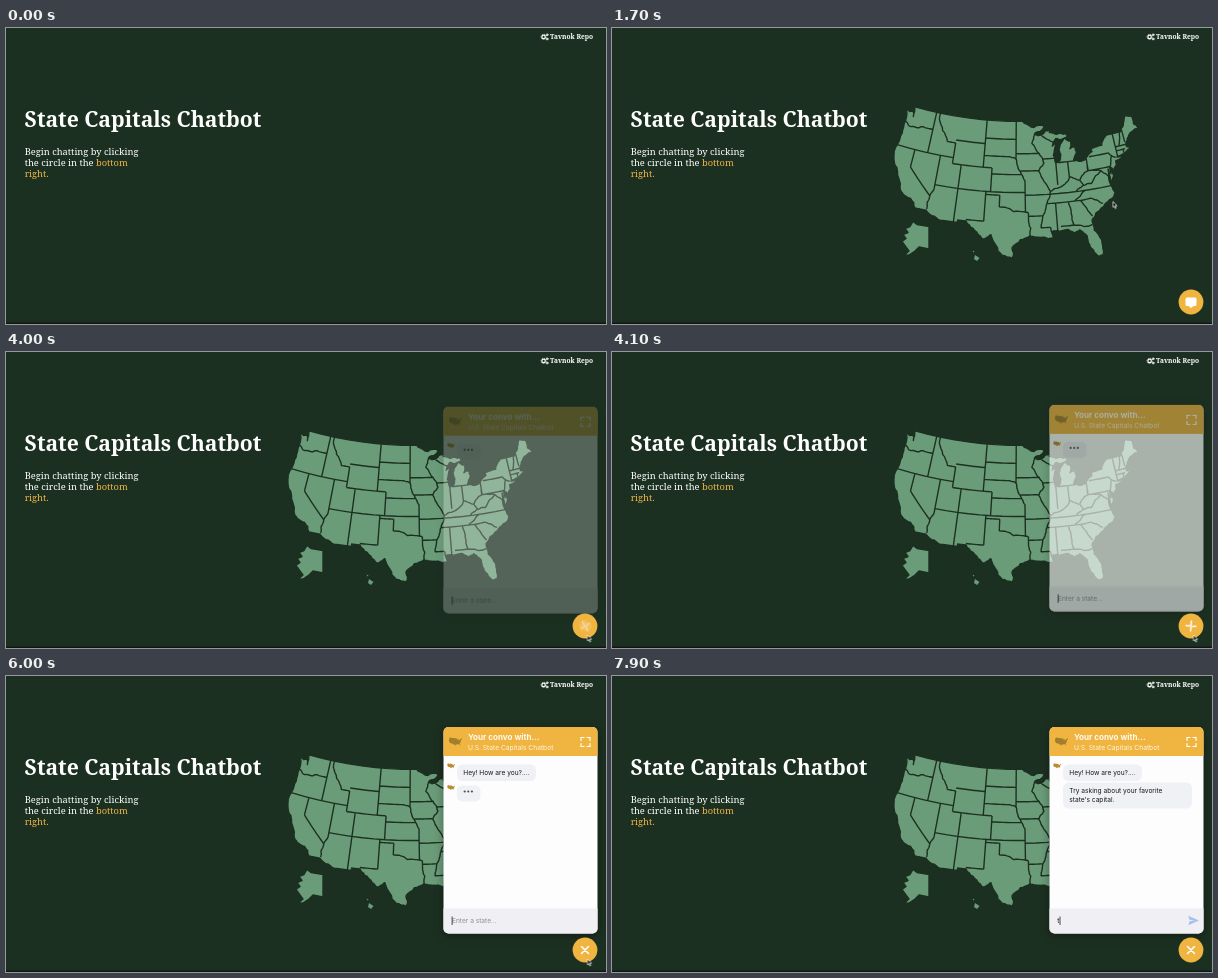
These frames come from a looping animation (600x296 px, 8000 ms). An HTML page:

```html
<!DOCTYPE html>
<html lang="en">
<head>
<meta charset="utf-8">
<title>State Capitals Chatbot</title>
<style>
  html, body { margin: 0; width: 100%; height: 100%; overflow: hidden; background: #1c3021; }
  svg { display: block; width: 100vw; height: 100vh; }
  text { white-space: pre; }
  .serif { font-family: "Noto Serif", serif; fill: #fff; }
  .sans { font: 6.6px Inter, sans-serif; fill: #16171a; }
  .bold { font-weight: 700; }
  .accent { fill: #efb548; }
  .yellow { fill: #f0b440; }
  .bubble { fill: #f0f1f5; }
  .line { fill: none; stroke: #fff; stroke-linecap: round; }
  .spin { transform-box: fill-box; transform-origin: center; }
  #map { fill: #6b9c79; stroke: #1c3021; stroke-width: 1.4; stroke-linejoin: round; }
  #panel { filter: drop-shadow(0 2px 5px rgba(0, 0, 0, .35)); }
</style>
</head>
<body>
<svg viewBox="0 0 600 296">
  <defs>
    <path id="land"/>
    <g id="dots" fill="#4c4e52">
      <circle cx="458.7" r="1.1"/><circle cx="462.3" r="1.1"/><circle cx="465.9" r="1.1"/>
    </g>
  </defs>
  <rect width="600" height="296" fill="#1c3021"/>
  <rect y="294.6" width="600" height="1.4" fill="#101511"/>

  <g class="line">
    <circle cx="537.6" cy="8.9" r="1.7" stroke-width="1.2"/>
    <circle cx="537.6" cy="8.9" r="2.6" stroke-width=".8" stroke-dasharray=".9 1.14" stroke-linecap="butt"/>
    <circle cx="541.1" cy="6.8" r=".9" stroke-width=".9"/>
    <circle cx="541.1" cy="11" r=".9" stroke-width=".9"/>
  </g>
  <text class="serif bold" x="544" y="11.1" font-size="6.6">Tavnok Repo</text>
  <text class="serif bold" x="18.5" y="98.5" font-size="21.15">State Capitals Chatbot</text>
  <g class="serif" font-size="9.3">
    <text x="18.7" y="127.2">Begin chatting by clicking</text>
    <text x="18.7" y="138.2">the circle in the <tspan class="accent">bottom</tspan></text>
    <text class="accent" x="18.7" y="149.2">right.</text>
  </g>

  <g id="map">
    <use href="#land"/>
    <path id="borders" fill="none"/>
    <path d="M301 193.500l4 3 12 2v22.500l-5-1-5-1-4 4-6 4-5 .5 5-4.500-3-4-4-5.500 4-3-3-4 5-2-3-4 5-2z"/>
    <path stroke="none" d="M363 227l4.500 3-2.500 3-3-2zM360.500 222.500l2 1-1 1z"/>
  </g>

  <g id="panel">
    <rect x="437.5" y="51" width="154" height="206.500" rx="5" fill="#fdfdfd"/>
    <path class="yellow" d="M437.500 80V56a5 5 0 0 1 5-5h144a5 5 0 0 1 5 5v24z"/>
    <path fill="#f0f0f4" d="M437.500 232.500h154v20a5 5 0 0 1-5 5h-144a5 5 0 0 1-5-5z"/>
    <use href="#land" fill="#a17e2c" transform="translate(449.500 65.500) scale(.054) translate(-404 -154)"/>
    <text class="sans bold" x="462" y="64.200" style="font-size:8.1px;fill:#fffaf0">Your convo with...</text>
    <text class="sans" x="462" y="73.600" style="font-size:6.7px;fill:#fff6e0">U.S. State Capitals Chatbot</text>
    <path class="line" stroke-width="1.2" d="M575 64.500v-3h3M581 61.500h3v3M584 67.500v3h-3M578 70.500h-3v-3"/>

    <use href="#land" fill="#b98a30" transform="translate(445.200 89.800) scale(.032) translate(-404 -154)"/>
    <g id="typing1">
      <rect class="bubble" x="451" y="88" width="23.500" height="16" rx="5"/>
      <use href="#dots" y="94"/>
    </g>
    <g id="message1">
      <rect class="bubble" x="451" y="88.500" width="79" height="16.500" rx="5.500"/>
      <text class="sans" x="457.300" y="99.400">Hey! How are you?....</text>
    </g>
    <g id="typing2">
      <use href="#land" fill="#b98a30" transform="translate(445.200 111.500) scale(.032) translate(-404 -154)"/>
      <rect class="bubble" x="451" y="109.500" width="23.500" height="16" rx="5"/>
      <use href="#dots" y="115.500"/>
    </g>
    <g id="message2">
      <rect class="bubble" x="451" y="106.500" width="129" height="26" rx="5.500"/>
      <text class="sans" x="457.300" y="117.400">Try asking about your favorite</text>
      <text class="sans" x="457.300" y="126">state's capital.</text>
    </g>

    <g id="empty">
      <text class="sans" x="446" y="247" style="fill:#8c8e94">Enter a state...</text>
      <rect x="445.700" y="240.500" width=".8" height="8.500" fill="#222"/>
    </g>
    <g id="typed">
      <text class="sans" x="445.300" y="247">t</text>
      <rect x="447.600" y="240.500" width=".8" height="8.500" fill="#222"/>
      <path fill="#a3c1f2" d="M576.300 239.800l10.700 4.700-10.700 4.700 1.200-3.900 5-.8-5-.8z"/>
    </g>
  </g>

  <g id="button">
    <circle class="yellow" cx="579" cy="274" r="12.400"/>
    <path id="chat" class="spin" fill="#fff" d="M575 269.500h8a1.500 1.500 0 0 1 1.500 1.500v5.500a1.500 1.500 0 0 1-1.500 1.500h-1.500l-2.500 2-2.500-2h-1.500a1.500 1.500 0 0 1-1.500-1.500v-5.500a1.500 1.500 0 0 1 1.500-1.500z"/>
    <path id="close" class="line spin" stroke-width="1.500" d="M575.500 270.500l7 7m0-7l-7 7"/>
  </g>
  <path id="cursor" d="M0 0V5.800L1.300 4.700 2.400 7 3.200 6.600 2.200 4.300H4Z" fill="#0a0d0a" stroke="#fff" stroke-width=".7"/>
</svg>

<script>
const LOOP = 8000;
const $ = id => document.getElementById(id);

// Albers equal-area conic projection, scaled to the stage.
const rad = Math.PI / 180;
const sinA = Math.sin(29.5 * rad), sinB = Math.sin(45.5 * rad);
const cone = (sinA + sinB) / 2, base = 1 + sinA * sinB;
function project([west, lat]) {
  const radius = 339 * Math.sqrt(base - 2 * cone * Math.sin(lat * rad)) / cone;
  const angle = cone * (96 - west) * rad;
  return [406.6 + radius * Math.sin(angle), radius * Math.cos(angle) - 280.2].map(v => v.toFixed(2));
}

let seed = 7;
const random = () => (seed = seed * 16807 % 2147483647) / 2147483647;

// Splits a leg by midpoints, pushed sideways for natural lines and left in place for surveyed ones.
function wander(a, b, rough, depth = 3) {
  if (!depth) return [a];
  const push = rough * (random() - .5);
  const mid = [(a[0] + b[0]) / 2 + (b[1] - a[1]) * push, (a[1] + b[1]) / 2 - (b[0] - a[0]) * push];
  return [...wander(a, mid, rough, depth - 1), ...wander(mid, b, rough, depth - 1)];
}
function trace(places, rough) {
  const legs = places.slice(1).flatMap((place, i) => {
    const surveyed = place[1] === places[i][1];
    return wander(places[i], place, surveyed ? 0 : rough);
  });
  return 'M' + [...legs, places[places.length - 1]].map(project).join('L');
}
const parse = text => text.trim().split(/\s+/).map(pair => pair.split(',').map(Number));

// Places are degrees west, degrees north.
const pacific = `117.1,32.5 118.4,33.9 120.6,34.6 122.4,37.6 124.3,40.4 124.2,42 124,46.2 124.7,48.3
  122.6,48.1 122.4,47.3 122.7,49 95.15,49`;
const lakes = `95.1,49.3 94.6,48.7 89.6,48 92.1,46.75 90.4,46.6 87.9,47.4 88.4,46.9 86.5,46.5 84.5,46.4 84,46
  87,45.8 88,44.55 87.2,45.1 87.9,43 87.5,41.7 86.8,41.8 86.2,42.9 86.4,44.1 84.8,45.75 83.4,45.1 83.9,43.8
  82.7,44 82.5,43 83.4,41.7 81.5,41.5 78.9,42.8 79,43.3 76.4,43.5 74.8,45 71.4,45`;
const atlantic = `70.3,45.9 69.2,47.4 67.8,47.1 67.8,45.7 67,44.85 70.2,43.6 70.9,42.3 70,41.8 71.4,41.45 73.6,41
  72,41.1 74,40.5 74.1,39.7 74.9,39 75.5,39.5 75.2,38.2 75.9,37.2 76.1,39.4 76.3,37 75.6,35.3 77.9,33.9
  79.2,33.1 81.3,31.5 81.2,29.7 80.1,27 80.3,25.4 81.1,25.15`;
const gulf = `82.7,27.8 82.7,28.9 84,30.1 85.2,29.7 86.3,30.4 89.5,30.2 89.2,29.1 91.3,29.4 93.8,29.7 97.2,27.8
  97.2,25.95 99.1,26.4 101.4,29.8 103,29 104.9,30.6 106.5,31.75 108.2,31.75 108.2,31.33 111.1,31.33 114.8,32.5`;
$('land').setAttribute('d', trace(parse([pacific, lakes, atlantic, gulf].join(' ')), .25) + 'Z');

const row = (lat, ...ends) => trace(ends.map(west => [west, lat]), 0);
const column = (west, ...ends) => trace(ends.map(lat => [west, lat]), 0);
const river = text => trace(parse(text), .2);

const surveyed = [
  row(46, 119, 117), row(45.94, 104, 96.6), row(45, 111, 104), row(43.5, 96.5, 91.2), row(43, 104, 98),
  row(42.72, 73.3, 70.8), row(42.5, 90.6, 87.8), row(42.03, 73.5, 71.3), row(42, 124.2, 111), row(42, 79.8, 75.3),
  row(41.7, 87, 83.4), row(41, 111, 102), row(40.6, 95.7, 91.5), row(40, 102, 95.3), row(39.72, 80.5, 75.5),
  row(37, 114, 94.6), row(36.55, 94.6, 76), row(36.5, 103, 100), row(35, 90.2, 83.1), row(33, 94, 91.1),
  row(32, 106.6, 103), row(31, 91.6, 89.7), row(31, 87.6, 85),
  column(120, 42, 39), column(117, 49, 42), column(114, 42, 36.2), column(111, 44.5, 41), column(109, 41, 31.3),
  column(104, 49, 41), column(103, 37, 32), column(102, 41, 37), column(100, 36.5, 34.5), column(96.6, 49, 42.5),
  column(94.6, 39, 33.6), column(94, 33.6, 32), column(88.3, 35, 30.3), column(87.5, 41.7, 38),
  column(84.8, 41.7, 39.1), column(80.5, 42, 39.7), column(75.7, 39.7, 38.4), column(73.4, 45, 41),
  column(71.8, 42, 41.3), column(71, 45.3, 43.1)
];
const natural = [
  '124,46.2 122.8,45.6 119,46', '116,49 116,48 113,44.5 111,44.5', '114,36.2 114.6,35 114.7,32.7',
  '98,43 96.5,42.5 95.3,40 94.6,39', '100,34.5 97,33.8 94,33.6', '94,32 93.6,31 93.8,29.7',
  '92.1,46.7 92.8,45.2 91.2,43.5 90.2,41.8 91.5,40.5 89.2,37 90.1,35 91.1,33 91.6,31', '89.7,31 89.6,30.2',
  '89.2,37 86,38 84.8,39.1 82.6,38.4 80.6,39.7 80.5,40.6', '90.4,46.5 87.6,45.1', '84.3,35 81.7,36.6',
  '83.1,35 81,35.1 78.6,33.9', '83.1,35 81.1,32.1', '85.6,35 85,31 82.2,30.5 81.4,30.7',
  '82.6,38.3 81.9,37.4 80.3,37.5 77.8,39.3', '82,37.5 83.7,36.6', '79.5,39.7 77.7,39.3 76.3,38',
  '75.3,42 74.7,41.4 75.1,40.6 75.5,39.6', '74.7,41.4 73.9,41', '72.5,42.7 71.5,45'
].map(river);
const desertEdge = trace(parse('120,39 114.6,35'), 0);
$('borders').setAttribute('d', [...surveyed, ...natural, desertEdge].join(''));

// Each step is [time in ms, value]; the ends hold their values.
function play(el, property, steps, easing = 'linear') {
  const all = [[0, steps[0][1]], ...steps, [LOOP, steps[steps.length - 1][1]]];
  el.animate(all.map(([t, value]) => ({ offset: t / LOOP, [property]: value, easing })),
    { duration: LOOP, iterations: Infinity });
}
const show = (id, from, to = LOOP) =>
  play($(id), 'opacity', [[0, 0], [from, 1], [to, to < LOOP ? 0 : 1]], 'steps(1)');
const at = (x, y) => `translate(${x}px, ${y}px)`;

for (const id of ['map', 'button']) play($(id), 'opacity', [[270, 0], [450, 1]]);

show('cursor', 1200, 7400);
play($('cursor'), 'transform', [
  [2950, at(501, 173.5)], [3200, at(556.3, 243)], [3500, at(581.5, 283)]
]);

play($('panel'), 'opacity', [[3900, 0], [4450, 1]], 'ease');
play($('panel'), 'transform', [[3900, at(0, 5)], [4450, at(0, 0)]], 'ease');
play($('chat'), 'opacity', [[3900, 1], [4020, 0]]);
play($('chat'), 'transform', [[3900, 'rotate(0deg)'], [4020, 'rotate(40deg)']]);
play($('close'), 'opacity', [[3950, 0], [4080, 1]]);
play($('close'), 'transform', [[3900, 'rotate(-90deg)'], [4280, 'rotate(0deg)']], 'ease-in-out');

show('typing1', 3900, 5400);
show('message1', 5400);
show('typing2', 5500, 6900);
show('message2', 6900);
play($('empty'), 'opacity', [[0, 1], [7400, 0]], 'steps(1)');
show('typed', 7400);

[...$('dots').children].forEach((dot, i) => dot.animate(
  [{ opacity: .45 }, { opacity: 1, offset: .25 }, { opacity: .45 }],
  { duration: 1600, delay: i * 200 - 1600, iterations: Infinity }));
</script>
</body>
</html>
```
